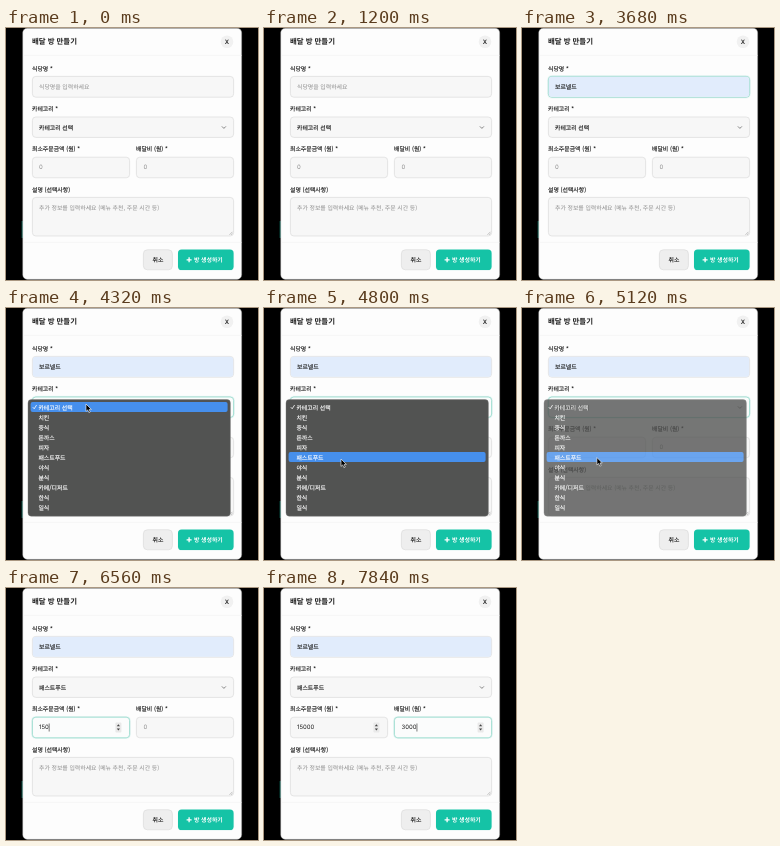
An HTML page that plays this animation: 252 px wide and 252 px high, repeating every 8 s.

```html
<!DOCTYPE html>
<html lang="ko">
<head>
<meta charset="utf-8">
<title>배달 방 만들기</title>
<style>
  html, body { margin: 0; width: 100%; height: 100%; overflow: hidden; background: #000; }
  svg { display: block; width: 100%; height: 100%; }
  text {
    font: 500 5.9px "Noto Sans CJK KR", "Noto Sans CJK", "Noto Sans CJK JP", sans-serif;
    fill: #1c1c1c; stroke: #1c1c1c; stroke-width: .14;
    dominant-baseline: central; text-rendering: geometricPrecision; white-space: pre;
  }
  .title { font-size: 7.4px; font-weight: 700; stroke: none; }
  .hint { font-weight: 400; fill: #8c8c8c; stroke: none; }
  .num { font: 400 6px Inter, Roboto, sans-serif; stroke: none; }
  .zero { fill: #8c8c8c; }
  .light { fill: #fff; stroke: #fff; }
  .bold { font-weight: 700; stroke: none; }
  .box { fill: #f7f7f7; stroke: #dcdcdc; stroke-width: .7; }
  .focus .ring { fill: #14b8a6; opacity: .07; }
  .focus .edge { fill: #fbfcfc; stroke: #86d8c8; stroke-width: .7; }
</style>
</head>
<body>
<svg id="stage" viewBox="0 0 252 252"></svg>
<script>
const DURATION = 8000;
const BRAND = "보르넬드";
const MENU = ["카테고리 선택", "치킨", "중식", "돈까스", "피자", "패스트푸드",
  "야식", "분식", "카페/디저트", "한식", "일식"];
const PICK = 5, ROW = 10, MENU_Y = 99;

const FIELDS = {
  name: { x: 26.4, y: 48.4, w: 201.2, h: 20.8, focus: [1200, 4080] },
  category: { x: 26.4, y: 89, w: 201.2, h: 20.4, focus: [4080, 5600] },
  minimum: { x: 26.4, y: 129.2, w: 97.2, h: 20.6, focus: [5600, 6960] },
  fee: { x: 130.4, y: 129.2, w: 97.2, h: 20.6, focus: [6960, Infinity] },
  note: { x: 26.4, y: 169.4, w: 201.2, h: 38.6 }
};
// Key press times for each number
const TYPED = {
  minimum: { value: "15000", keys: [6080, 6320, 6480, 6640, 6800] },
  fee: { value: "3000", keys: [7440, 7520, 7680, 7840] }
};
// time, x, y of the pointer tip
const POINTER = [[3840, 85, 84], [4160, 80, 96], [4400, 80, 96], [4720, 77, 149],
  [4800, 77, 151], [5040, 77, 151], [5280, 69, 145.5], [5600, 69, 145.5]];

const text = (x, y, s, cls = "", id = "") =>
  `<text x="${x}" y="${y}" class="${cls}" id="${id}">${s}</text>`;
const rect = (x, y, w, h, r, attrs) =>
  `<rect x="${x}" y="${y}" width="${w}" height="${h}" rx="${r}" ${attrs}/>`;

function field(id, { x, y, w, h, focus }) {
  const glow = focus ? `<g class="focus" id="${id}Focus">
    ${rect(x - 1.3, y - 1.3, w + 2.6, h + 2.6, 4.6, 'class="ring"')}
    ${rect(x, y, w, h, 3.4, 'class="edge"')}</g>` : "";
  return rect(x, y, w, h, 3.4, 'class="box"') + glow;
}

const spinner = (id, x) => `<g id="${id}Spinner">
  ${rect(x - 3, 134.4, 6, 10, 1, 'fill="#e9e9e9"')}
  <path d="M${x - 1.6} 138.3l1.6-2 1.6 2zM${x - 1.6} 140.6l1.6 2 1.6-2z" fill="#444"/></g>`;

const caret = (id, x, y) => rect(x, y - 4, .6, 8, 0, `fill="#222" id="${id}Caret"`);

const stage = document.getElementById("stage");
stage.innerHTML = `
  <rect width="252" height="252" fill="#000"/>
  <path d="M15.6 193h2v17h-2z" fill="#0a5a4c"/>
  ${rect(16.7, .2, 219, 251.2, 4.6, 'fill="#fdfdfd" stroke="#8a8a8a" stroke-width=".4"')}
  <path d="M17 27.4H235.5M17 214.4H235.5" stroke="#f5f5f5" stroke-width=".7"/>
  ${text(26, 13.6, "배달 방 만들기", "title")}
  <circle cx="221" cy="13.8" r="6.3" fill="#f1f1f1"/>
  <text x="221" y="14" text-anchor="middle" class="num" style="font-weight:600">X</text>

  ${text(26, 40.4, "식당명 *")}
  ${text(26, 80.6, "카테고리 *")}
  ${text(26, 120.8, "최소주문금액 (원) *")}
  ${text(130, 120.8, "배달비 (원) *")}
  ${text(26, 161, "설명 (선택사항)")}
  ${Object.entries(FIELDS).map(([id, f]) => field(id, f)).join("")}

  ${rect(26.8, 48.8, 200.4, 20, 3.1, 'fill="#e1ecfc" id="autofill"')}
  ${text(33, 58.6, "식당명을 입력하세요", "hint", "nameHint")}
  ${text(33, 58.6, BRAND, "", "nameValue")}
  ${text(33, 99, MENU[0], "", "categoryValue")}
  <path d="M215.9 98.4l2 2 2-2" fill="none" stroke="#666" stroke-width=".8"/>
  ${text(33, 139.5, "0", "num", "minimumValue")}
  ${text(137.6, 139.5, "0", "num", "feeValue")}
  ${spinner("minimum", 112.4)}${spinner("fee", 216.6)}
  ${caret("name", 33, 59)}${caret("minimum", 33, 139.5)}${caret("fee", 137.6, 139.5)}
  ${text(33, 179.4, "추가 정보를 입력하세요 (메뉴 추천, 주문 시간 등)", "hint")}
  <path d="M223.5 206.8l3-3M225.3 206.8l1.2-1.2" stroke="#888" stroke-width=".5"/>

  ${rect(137.4, 221.8, 29, 20, 4, 'fill="#eee" stroke="#dcdcdc" stroke-width=".7"')}
  <text x="151.9" y="231.6" text-anchor="middle">취소</text>
  ${rect(171.6, 222, 56.6, 21, 4.4, 'fill="#14b8a6" opacity=".07"')}
  ${rect(172, 221.4, 55.6, 20.6, 3.6, 'fill="#15c3a6"')}
  <path d="M180.6 231.8h5M183.1 229.3v5" stroke="#fff" stroke-width="1.3"/>
  ${text(188, 231.6, "방 생성하기", "light bold")}

  <g id="suggest">
    <path d="M73 73.6l3.8-3.8 3.8 3.8z" fill="#171819"/>
    ${rect(69, 73, 68.2, 35, 3.4, 'fill="#171819"')}
    ${rect(71, 75.6, 64.2, 14.6, 2.4, 'fill="#37393b" id="suggestHover"')}
    ${[82.4, 98.6].map(y => `<text x="74" y="${y}" class="light" style="font-size:5.4px">${BRAND}</text>`).join("")}
  </g>

  <g id="menu">
    ${rect(22, 91.6, 202.4, 116.6, 3.4, 'fill="#525352" stroke="#777" stroke-width=".4"')}
    ${rect(24.6, 94.1, 197, 9.8, 2, 'fill="#468fec" id="menuHover"')}
    <path d="M26.8 99.2l1.4 1.6 2.4-3.8" fill="none" stroke="#fff" stroke-width=".8"/>
    ${MENU.map((s, i) => text(32.4, MENU_Y + i * ROW, s, "light")).join("")}
  </g>
  <path id="pointer" d="M0 0v7.4l1.7-1.5 1.2 2.7 1.4-.6-1.2-2.6h2.3z"
    fill="#000" stroke="#fff" stroke-width=".6"/>`;

const el = Object.fromEntries([...stage.querySelectorAll("[id]")].map(n => [n.id, n]));
const ramp = (t, from, length) => Math.min(1, Math.max(0, (t - from) / length));
const ease = p => p * p * (3 - 2 * p);
const fade = (t, from, to, rise, fall = rise) => ease(ramp(t, from, rise)) * (1 - ease(ramp(t, to, fall)));
const show = (node, amount) => node.setAttribute("opacity", Number(amount));
const blink = (t, since) => t >= since && (t - since) % 1000 < 500;

function pointerAt(t) {
  const i = POINTER.findIndex(k => k[0] > t);
  if (i < 1) return null;
  const [t0, x0, y0] = POINTER[i - 1], [t1, x1, y1] = POINTER[i];
  const p = ease(ramp(t, t0, t1 - t0));
  return [x0 + (x1 - x0) * p, y0 + (y1 - y0) * p];
}

function renderNumber(id, t) {
  const { value, keys } = TYPED[id];
  const [start, end] = FIELDS[id].focus;
  const count = keys.filter(k => k <= t).length;
  const node = el[id + "Value"];
  node.textContent = count ? value.slice(0, count) : "0";
  node.classList.toggle("zero", !count);
  const x = +node.getAttribute("x") + (count ? node.getComputedTextLength() : 0);
  el[id + "Caret"].setAttribute("x", x);
  show(el[id + "Caret"], t < end && blink(t, count ? keys[count - 1] : start));
  show(el[id + "Spinner"], t >= start);
}

function render(t) {
  for (const [id, { focus }] of Object.entries(FIELDS))
    if (focus) show(el[id + "Focus"], fade(t, ...focus, 240));

  const filled = t >= 2960;
  show(el.autofill, filled);
  show(el.nameValue, filled);
  show(el.nameHint, !filled);
  show(el.nameCaret, !filled && blink(t, 1210));
  show(el.suggest, fade(t, 2000, 3200, 160, 240));
  show(el.suggestHover, filled);

  el.categoryValue.textContent = MENU[t < 5360 ? 0 : PICK];
  show(el.menu, fade(t, 4160, 5040, 80, 275));
  const tip = pointerAt(t);
  show(el.pointer, tip !== null);
  if (tip) {
    el.pointer.setAttribute("transform", `translate(${tip})`);
    const row = Math.max(0, Math.min(PICK, Math.round((tip[1] - MENU_Y) / ROW)));
    el.menuHover.setAttribute("y", MENU_Y - 4.9 + row * ROW);
  }

  renderNumber("minimum", t);
  renderNumber("fee", t);
}

const began = performance.now();
function tick() {
  render((performance.now() - began) % DURATION);
  requestAnimationFrame(tick);
}
tick();
</script>
</body>
</html>
```
